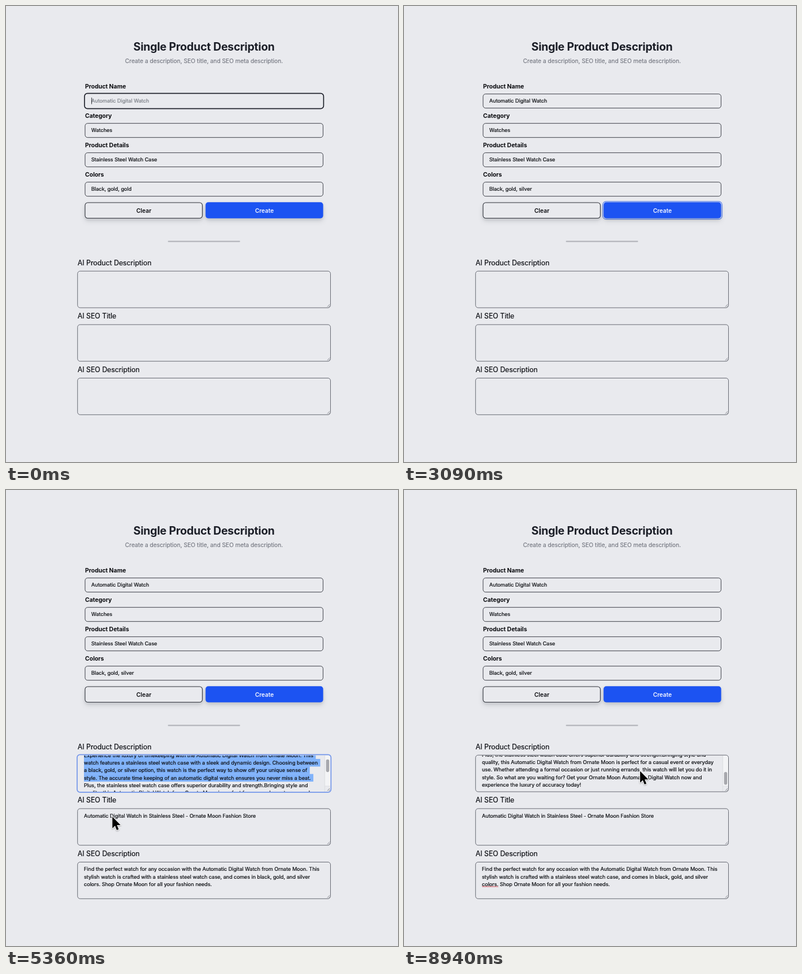
An HTML page that plays this animation: 694 by 807 pixels, repeating every 8970 ms.

```html
<!DOCTYPE html>
<html lang="en">
<head>
<meta charset="utf-8">
<title>Single Product Description</title>
<style>
  html, body { margin: 0; width: 100%; height: 100%; overflow: hidden; background: #e9eaee; }
  svg { display: block; width: 694px; height: 807px; font-family: Inter, Roboto, sans-serif; }
  text { white-space: pre; }
  .title { font-size: 19.6px; font-weight: 700; letter-spacing: -.2px; fill: #1b1e27; text-anchor: middle; }
  .sub { font-size: 10.25px; fill: #72757f; stroke: #72757f; stroke-width: .15px; text-anchor: middle; }
  .label { font-size: 10.5px; font-weight: 700; letter-spacing: -.04px; fill: #0b0c10; }
  .head { font-size: 12.5px; letter-spacing: -.1px; fill: #0d0f14; stroke: #0d0f14; stroke-width: .2px; }
  .body { font-size: 9.09px; fill: #0e1014; stroke: #0e1014; stroke-width: .24px; }
  .body.hint { fill: #7d8088; stroke: #7d8088; }
  .btn { font-size: 10.3px; font-weight: 600; text-anchor: middle; }
  .shadow { filter: drop-shadow(0 5px 4px rgba(30, 35, 50, .13)) drop-shadow(0 2px 2px rgba(30, 35, 50, .1)); }
  .pointer { filter: drop-shadow(0 1.5px 1.2px rgba(0, 0, 0, .3)); }
</style>
</head>
<body>
<svg id="stage" viewBox="0 0 694 807"></svg>
<script>
const LOOP = 8970;
const LINE = 13.33;
const BRAND = "Ornate Moon";
const NAME = "Automatic Digital Watch";
const stage = document.getElementById("stage");

function add(tag, attrs, parent = stage) {
  const el = document.createElementNS("http://www.w3.org/2000/svg", tag);
  for (const key in attrs) el.setAttribute(key, attrs[key]);
  parent.appendChild(el);
  return el;
}
function label(cls, x, y, str, parent = stage, fill) {
  const el = add("text", { class: cls, x, y }, parent);
  if (fill) el.setAttribute("fill", fill);
  el.textContent = str;
  return el;
}
function box(x, y, width, height, rx, attrs = {}, parent = stage) {
  return add("rect", { x, y, width, height, rx, fill: "none", ...attrs }, parent);
}
const show = (el, on) => el.setAttribute("display", on ? "inline" : "none");
const clamp = (v, lo, hi) => Math.max(lo, Math.min(hi, v));
const setText = (el, str) => { if (el.textContent !== str) el.textContent = str; };

// Form
label("title", 350.5, 79, "Single Product Description");
label("sub", 350.5, 100.8, "Create a description, SEO title, and SEO meta description.");
const fields = [
  ["Product Name", NAME],
  ["Category", "Watches"],
  ["Product Details", "Stainless Steel Watch Case"],
  ["Colors", "Black, gold, gold"]
].map(([name, value], i) => {
  const y = 52 * i;
  label("label", 140, 146 + y, name);
  return {
    frame: box(140, 155.7 + y, 421.3, 25, 4.5, { stroke: "#3a3d45" }),
    ring: box(139, 154.7 + y, 423.3, 27, 5.2, { stroke: "#20232c", "stroke-width": 1.7 }),
    text: label("body", 151, 171.4 + y, value)
  };
});

box(140, 348, 207.6, 27.5, 4.8, { fill: "#e9eaee", stroke: "#30333b", "stroke-width": 1.1, class: "shadow" });
const createRing = box(351.7, 345.8, 211.5, 31.6, 6, { fill: "#e3e8f6", stroke: "#5c84ec", "stroke-width": 1.2 });
box(353.3, 347.3, 208.2, 28.4, 4.8, { fill: "#1c53f2", class: "shadow" });
label("btn", 244, 365.7, "Clear", stage, "#0b0c10");
label("btn", 457.5, 365.7, "Create", stage, "#f5f7ff");
box(286.5, 415.5, 128, 2.2, 1.1, { fill: "#b4b5bb" });

// Result areas
const lines = [
  `Experience the luxury of timekeeping with the ${NAME} from ${BRAND}. This`,
  "watch features a stainless steel watch case with a sleek and dynamic design. Choosing between",
  "a black, gold, or silver option, this watch is the perfect way to show off your unique sense of",
  "style. The accurate time keeping of an automatic digital watch ensures you never miss a beat.",
  "Plus, the stainless steel watch case offers superior durability and strength.Bringing style and",
  `quality, this ${NAME} from ${BRAND} is perfect for a casual event or everyday`,
  "use. Whether attending a formal occasion or just running errands, this watch will let you do it in",
  `style. So what are you waiting for? Get your ${BRAND} ${NAME} now and`,
  "experience the luxury of accuracy today!"
];
const metaLines = [
  `Find the perfect watch for any occasion with the ${NAME} from ${BRAND}. This`,
  "stylish watch is crafted with a stainless steel watch case, and comes in black, gold, and silver",
  `colors. Shop ${BRAND} for all your fashion needs.`
];
const areaTop = [469.2, 563.9, 658.5];
const clip = add("clipPath", { id: "view" }, add("defs", {}));
box(127, 469.7, 447, 64.2, 4, { fill: "#000" }, clip);

const results = add("g", {});
const view = add("g", { "clip-path": "url(#view)" }, results);
const scroller = add("g", {}, view);
const marks = lines.map((_, i) => box(138, 475 + i * LINE, 0, LINE + .2, 0, { fill: "#80b2fa" }, scroller));
const rows = lines.map((str, i) => label("body", 138, 485 + i * LINE, str, scroller));
box(564.3, 469.7, 10, 54.3, 0, { fill: "#f3f4f6" }, view);
add("path", { d: "M564.3 469V534M564.3 524H574", stroke: "#d9dadf", "stroke-width": .8 }, view);
const thumb = box(566.6, 471.5, 5.6, 22.5, 2.8, { fill: "#a7a8ad" }, view);
label("body", 138, 579.6, `${NAME} in Stainless Steel - ${BRAND} Fashion Store`, results);
const meta = metaLines.map((str, i) => label("body", 138, 674.4 + i * LINE, str, results));
let wave = "M138 702";
for (let x = 138; x < 164; x += 2.6) wave += "q.65 -1.5 1.3 0t1.3 0";
const squiggle = add("path", { d: wave, fill: "none", stroke: "#e0414d", "stroke-width": .9 }, results);

const areas = areaTop.map((y, i) => {
  label("head", 126.8, y - 10.5, ["AI Product Description", "AI SEO Title", "AI SEO Description"][i]);
  add("path", { d: `M568.8 ${y + 63.2}l4.4 -4.6M571.4 ${y + 63.4}l2 -2.1`, stroke: "#70737b", "stroke-width": .8 });
  return {
    frame: box(126.7, y, 447.8, 64.8, 4.5, { stroke: "#666972" }),
    ring: box(125.9, y - .8, 449.5, 66.4, 5, { stroke: "#7396ea", "stroke-width": 1.7 })
  };
});

const caret = add("rect", { width: .9, height: 11.5, fill: "#16181e" });

// Mouse
const arrow = add("path", {
  class: "pointer", d: "M0 0V20.4L4.7 16 7.8 23.6 11.2 22.2 8.1 14.7H14.6Z",
  fill: "#000", stroke: "#fff", "stroke-width": 2, "paint-order": "stroke", "stroke-linejoin": "round"
});
const beam = add("g", {});
for (const [stroke, width] of [["#f5f5f7", 3.4], ["#111", 1.6]])
  add("path", {
    d: "M-4.8 -11.2Q0 -11.2 0 -8Q0 -11.2 4.8 -11.2M0 -8V8M-4.8 11.2Q0 11.2 0 8Q0 11.2 4.8 11.2M-2.6 3.2H2.6",
    fill: "none", stroke, "stroke-width": width, "stroke-linecap": "round"
  }, beam);

// time, x, y
const track = [
  [4480, 338, 352], [4600, 328, 354], [4850, 309, 393], [4910, 309, 393], [5150, 139, 479],
  [5220, 139, 479], [5430, 205, 612], [5600, 230, 606], [5820, 245, 562], [5960, 245, 562],
  [6360, 318, 665], [6600, 364.5, 721.5], [6780, 364.5, 721.5], [7040, 656, 655],
  [7140, 656, 655], [7820, 418, 497.5]
];
function mouseAt(t) {
  const i = track.findIndex(p => p[0] > t);
  if (i < 0) return track[track.length - 1].slice(1);
  const [t0, x0, y0] = track[i - 1], [t1, x1, y1] = track[i];
  const u = (t - t0) / (t1 - t0), k = u * u * (3 - 2 * u);
  return [x0 + (x1 - x0) * k, y0 + (y1 - y0) * k];
}

function colorsAt(t) {
  const full = "Black, gold, gold", keep = "Black, gold, ";
  if (t < 2200) return full.slice(0, full.length - clamp(Math.floor((t - 1850) / 75), 0, 4));
  return keep + "silver".slice(0, clamp(Math.floor((t - 2200) / 75), 0, 6));
}

function placeCaret(el, chars, on) {
  show(caret, on);
  const x = +el.getAttribute("x") + (chars ? el.getSubStringLength(0, chars) : 0);
  caret.setAttribute("x", x + .2);
  caret.setAttribute("y", el.getAttribute("y") - 9.2);
}

function render(t) {
  const typed = clamp(Math.floor((t - 250) / 52), 0, NAME.length);
  const focus = t < 1600 ? 0 : t < 2780 ? 3 : -1;
  setText(fields[0].text, typed ? NAME.slice(0, typed) : NAME);
  fields[0].text.classList.toggle("hint", !typed);
  setText(fields[3].text, colorsAt(t));
  fields.forEach((f, i) => {
    show(f.ring, i === focus);
    show(f.frame, i !== focus);
  });
  show(createRing, t >= 2780 && t < 3750);
  show(results, t >= 3750);
  show(squiggle, t >= 6480);

  const area = t >= 5180 && t < 6480 ? 0 : t >= 6480 && t < 7100 ? 2 : -1;
  areas.forEach((a, i) => {
    show(a.ring, i === area);
    show(a.frame, i !== area);
  });

  const picked = area === 0 ? clamp(Math.floor((t - 5220) / 35), 0, 9) : 0;
  marks.forEach((m, i) => {
    const extra = i < 8 ? 4.4 : .4;
    m.setAttribute("width", i < picked ? rows[i].getComputedTextLength() + extra : 0);
  });
  const scroll = clamp((t - 5320) / 220, 0, 1);
  scroller.setAttribute("transform", `translate(0 ${-scroll * 5 * LINE})`);
  thumb.setAttribute("y", 471.5 + scroll * 27.5);

  if (focus === 0) placeCaret(fields[0].text, typed, true);
  else if (focus === 3) placeCaret(fields[3].text, fields[3].text.textContent.length, true);
  else if (area === 2) placeCaret(meta[2], metaLines[2].length, t < 6980);
  else show(caret, false);

  show(arrow, false);
  show(beam, false);
  if (t < track[0][0]) return;
  const [x, y] = mouseAt(t);
  const dragging = t > 5300 && t < 5960;
  const inside = x > 126 && x < 575 && areaTop.some(top => y > top && y < top + 65);
  const shape = inside && !dragging && t < 7400 ? beam : arrow;
  show(shape, true);
  shape.setAttribute("transform", `translate(${x} ${y})`);
}

const start = performance.now();
function tick() {
  render((performance.now() - start) % LOOP);
  requestAnimationFrame(tick);
}
render(0);
requestAnimationFrame(tick);
</script>
</body>
</html>
```
